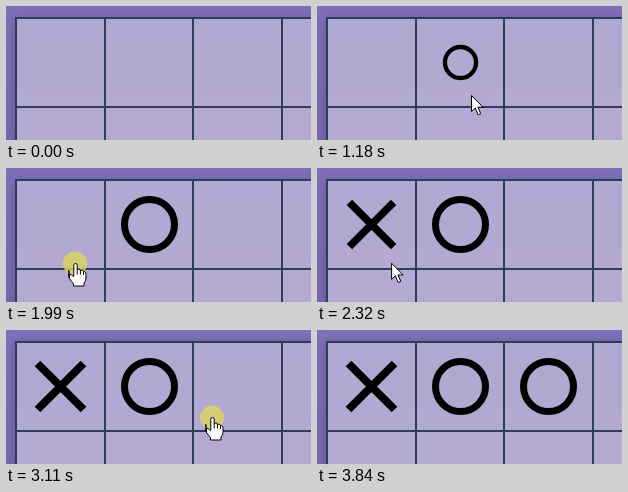
Recreate the animation shown at these times as an HTML page. Size 305 by 134 pixels, loop 4600 ms.

```html
<!DOCTYPE html>
<html lang="en">
<head>
<meta charset="utf-8">
<title>Tic-tac-toe</title>
<style>
  html, body { margin: 0; width: 100%; height: 100%; overflow: hidden; background: #7c6cb6; }
  svg { display: block; width: 305px; height: 134px; }
  .board { fill: url(#cells); stroke: #2c3e5a; stroke-width: 2; filter: drop-shadow(0 2px 4px #0003); }
  .lines { stroke: #2c3e5a; stroke-width: 2; }
  .mark { fill: none; stroke: #000; }
  .cursor { fill: #fff; stroke: #000; stroke-linejoin: round; }
</style>
</head>
<body>
<svg viewBox="0 0 305 134">
  <defs>
    <linearGradient id="page" x2="0" y2="1">
      <stop stop-color="#7e6fb9"/><stop offset="1" stop-color="#7866b0"/>
    </linearGradient>
    <linearGradient id="cells" gradientUnits="userSpaceOnUse" x1="0" y1="12" x2="0" y2="134">
      <stop stop-color="#b0a9d3"/><stop offset="1" stop-color="#b4a9d1"/>
    </linearGradient>
  </defs>
  <rect width="305" height="134" fill="url(#page)"/>
  <rect class="board" x="10" y="12" width="400" height="300"/>
  <path class="lines" d="M99 12V134M187 12V134M276 12V134M10 101H305"/>
  <g class="mark">
    <circle id="first" r="25" stroke-width="7"/>
    <path id="second" d="M-23-23L23 23M23-23L-23 23" stroke-width="8"/>
    <circle id="third" r="25" stroke-width="7"/>
  </g>
  <circle id="press" r="12" fill="#dcd65c" fill-opacity=".8"/>
  <g id="cursor" class="cursor">
    <path id="hand" d="M-1.2 13V2Q-1.2.5.5.5T2.2 2V7Q2.4 5.8 4 6T5.4 8Q5.8 6.8 7.2 7.2T8.5 9Q9.2 8 10.2 9T11 11V15Q11 18 9 20V23H-1.5V20.5Q-3.5 18.5-5.5 15.5Q-7-1 -5.5 15.5L-6.5 13.5Q-6.8 11.5-5 11.3Q-3.5 11.3-1.2 14M2.2 7V11.5M5.4 8V11.5M8.5 9V12"/>
    <path id="arrow" d="M.5.5V16.5L4.3 13L7.1 19.8L9.7 18.7L6.9 12.2H12Z"/>
  </g>
</svg>
<script>
const LOOP = 4600;
const PRESS_TIME = 100;
const $ = id => document.getElementById(id);

const marks = [
  { el: $('first'), x: 143.5, col: 1, at: 940 },
  { el: $('second'), x: 54.5, col: 0, at: 1920 },
  { el: $('third'), x: 231.5, col: 2, at: 3110 }
];

const linear = p => p;
const smooth = p => (1 - Math.cos(Math.PI * p)) / 2;
const easeOut = p => 1 - (1 - p) ** 2;
const easeIn = p => p * p;

// [time, x, y, easing into this point]
const route = [
  [430, 158, 130], [770, 154, 89, easeOut],
  [1200, 154, 89, linear], [1440, 108, 92, easeIn],
  [1540, 97, 93, linear], [1660, 69, 95, easeOut],
  [2230, 69, 95, linear], [2410, 89, 94, easeIn],
  [2770, 206, 87, easeOut], [3400, 206, 87, linear],
  [3610, 234, 105, easeIn], [3840, 285, 140, linear]
];

// [ms after press, scale]
const pop = [[130, 0], [335, 1.1], [415, 0.95], [500, 1]];

function sample(keys, t, ease) {
  const i = keys.findIndex(k => k[0] > t);
  if (i < 0) return keys[keys.length - 1].slice(1);
  if (i === 0) return keys[0].slice(1);
  const a = keys[i - 1], b = keys[i];
  const p = (ease || b[3])((t - a[0]) / (b[0] - a[0]));
  return [1, 2].map(n => a[n] + (b[n] - a[n]) * p);
}

function show(el, visible) {
  el.style.display = visible ? '' : 'none';
}

function draw(now) {
  const t = now % LOOP;
  const [x, y] = sample(route, t);

  for (const m of marks) {
    const [scale] = sample(pop, t - m.at, smooth);
    show(m.el, scale > 0);
    m.el.setAttribute('transform', `translate(${m.x} 56.5) scale(${scale})`);
  }

  const col = x < 99 ? 0 : x < 187 ? 1 : x < 276 ? 2 : 3;
  const taken = y < 101 && marks.some(m => m.col === col && t >= m.at + PRESS_TIME);
  show($('cursor'), t >= 430 && t < 3840);
  show($('arrow'), taken);
  show($('hand'), !taken);
  $('cursor').setAttribute('transform', `translate(${x} ${y})`);

  show($('press'), marks.some(m => t >= m.at && t < m.at + PRESS_TIME));
  $('press').setAttribute('transform', `translate(${x} ${y + 0.5})`);
}

function frame() {
  draw(performance.now());
  requestAnimationFrame(frame);
}
frame();
</script>
</body>
</html>
```
